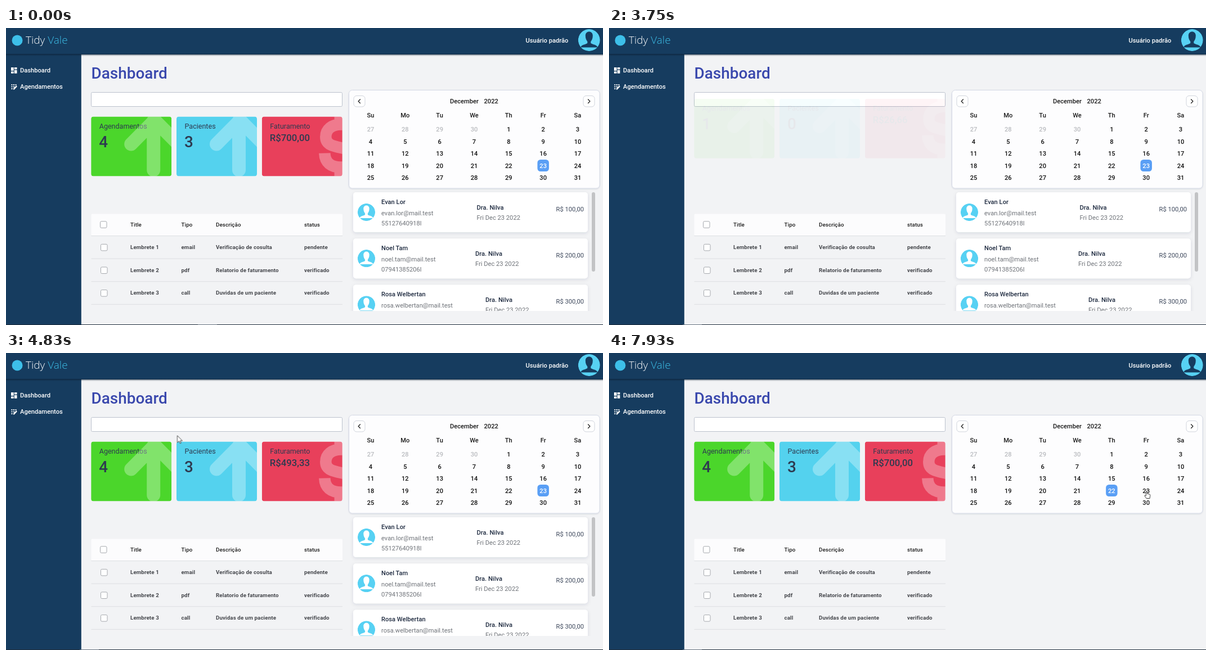
An HTML page that plays this animation: 1061 by 528 pixels, repeating every 8000 ms.

```html
<!DOCTYPE html>
<html lang="pt">
<head>
<meta charset="utf-8">
<title>Dashboard</title>
<style>
html, body { margin: 0; width: 100%; height: 100%; overflow: hidden; background: #f2f3f5; }
svg { display: block; width: 100%; height: 100%; }
text { font: 500 11.15px Roboto, sans-serif; fill: #1a1a1a; white-space: pre; }
.nav { fill: #fff; }
.brand { font: 300 19px "Open Sans", sans-serif; fill: #fff; }
.h1 { font-size: 27.9px; fill: #3a48ad; }
.label { font-size: 12.55px; font-weight: 400; fill: #2e3a50; }
.count { font-size: 27.9px; fill: #2e3a50; }
.money { font-size: 16.73px; fill: #2e3a50; }
.th, .td { font-size: 9.76px; letter-spacing: .0107em; }
.td { font-weight: 600; fill: #45474c; }
.day { fill: #111; text-anchor: middle; }
.out { fill: #b9bbbf; }
.on { fill: #fff; }
.mid { text-anchor: middle; }
.name { fill: #1f2b40; }
.soft { font-weight: 400; fill: #6e7278; }
.price { font-weight: 400; fill: #3b465a; text-anchor: end; }

#cards, #cursor, .before, .after, .arrow, .beam, .hand, .tab { animation: 8s linear infinite; }
#cards { animation-name: drop; }
#cursor { animation-name: travel; }
.before { animation-name: before; animation-timing-function: step-end; }
.after { animation-name: after; animation-timing-function: step-end; }
.arrow { animation-name: arrow; animation-timing-function: step-end; }
.beam { animation-name: beam; animation-timing-function: step-end; }
.hand { animation-name: hand; animation-timing-function: step-end; }
.tab { animation-name: tab; animation-timing-function: step-end; }

@keyframes drop {
  0%, 46.62% { transform: none; opacity: 1; }
  46.625% { transform: translateY(-34px); opacity: .035; }
  48.9% { transform: translateY(-15px); opacity: .23; }
  51% { transform: translateY(-4.2px); opacity: .5; }
  53.5% { transform: translateY(-.2px); opacity: .97; }
  54.4%, 100% { transform: none; opacity: 1; }
}
@keyframes travel {
  0%, 6.375% { transform: translate(842px, 497px); animation-timing-function: ease-in; }
  10.6% { transform: translate(387px, 241px); animation-timing-function: ease-out; }
  15.75% { transform: translate(41px, 17px); }
  17.5% { transform: translate(35px, 10px); }
  19.2%, 53.7% { transform: translate(33px, -20px); }
  53.71% { transform: translate(86px, -18px); }
  56.9% { transform: translate(165px, 98px); }
  57.75% { transform: translate(179px, 113px); animation-timing-function: ease-out; }
  67.75% { transform: translate(495px, 198px); }
  69.7% { transform: translate(503px, 201px); animation-timing-function: ease-in-out; }
  78.2% { transform: translate(794px, 223px); animation-timing-function: ease-out; }
  84% { transform: translate(893px, 244px); }
  89% { transform: translate(896px, 246px); animation-timing-function: ease-in-out; }
  92.2% { transform: translate(954px, 246px); }
  93.25%, 95.7% { transform: translate(948px, 245px); }
  99.1%, 100% { transform: translate(955.5px, 245px); }
}
@keyframes before { 0% { opacity: 1; } 85.5%, 100% { opacity: 0; } }
@keyframes after { 0% { opacity: 0; } 85.5%, 100% { opacity: 1; } }
@keyframes arrow { 0% { opacity: 0; } 6.375% { opacity: 1; } 19.1% { opacity: 0; } 53.7% { opacity: 1; } 68.6% { opacity: 0; } 71% { opacity: 1; } 82%, 100% { opacity: 0; } }
@keyframes beam { 0% { opacity: 0; } 68.6% { opacity: .6; } 71%, 100% { opacity: 0; } }
@keyframes hand { 0% { opacity: 0; } 82%, 100% { opacity: 1; } }
@keyframes tab { 0% { transform: none; } 28.25%, 100% { transform: translateX(-210px); } }
</style>
</head>
<body>
<svg viewBox="0 0 1061 528" preserveAspectRatio="none">
  <defs>
    <filter id="shadow" x="-10%" y="-20%" width="120%" height="150%">
      <feDropShadow dx="0" dy="2" stdDeviation="3" flood-color="#1c2c48" flood-opacity=".11"/>
    </filter>
    <filter id="lift" x="-5%" y="-5%" width="110%" height="115%">
      <feDropShadow dx="0" dy="1" stdDeviation=".8" flood-color="#1c2c48" flood-opacity=".12"/>
    </filter>
    <linearGradient id="edge" x2="0" y2="1">
      <stop stop-color="#0b2035" stop-opacity=".7"/><stop offset="1" stop-color="#0b2035" stop-opacity="0"/>
    </linearGradient>
    <clipPath id="round"><circle r="19.5"/></clipPath>
    <clipPath id="tile"><rect width="143" height="106" rx="4"/></clipPath>
    <clipPath id="panel"><rect x="605" y="286" width="456" height="217"/></clipPath>
    <g id="person" clip-path="url(#round)">
      <circle r="19.5" fill="#57d1f3"/>
      <path d="M-6.500-8C-6.500-17.500 6.500-17.500 6.500-8C6.500-3 5 0 3 2.500V5.500C6 8 14 8 15 13H-15C-14 8-6 8-3 5.500V2.500C-5 0-6.500-3-6.500-8Z"/>
    </g>
    <path id="up" d="M71 49L113 6.500L155 49M111 7V95" fill="none" stroke="#fff" stroke-opacity=".3" stroke-width="24" stroke-linecap="round"/>
  </defs>

  <rect width="1061" height="528" fill="#f2f3f5"/>
  <path d="M0 0H1061V47H133.800V528H0Z" fill="#163c5f"/>
  <rect y="46" width="1061" height="4" fill="url(#edge)"/>
  <circle cx="20" cy="22" r="9.500" fill="#3dbfe9"/>
  <text class="brand" x="35" y="28">Tidy <tspan fill="#3dbfe9">Vale</tspan></text>
  <text class="nav" x="923.500" y="26">Usuário padrão</text>
  <use href="#person" x="1036.300" y="21.600" fill="#163c5f"/>

  <g fill="#fff">
    <path d="M9 70h4.700v6H9zM14.800 70h4.700v3.500h-4.700zM9 77.200h4.700v3.500H9zM14.800 74.700h4.700v6h-4.700z"/>
    <path d="M9.500 100h2v2h-2zM13 100h2v2h-2zM16.500 100h2v2h-2zM9.500 103.500h2v2h-2zM13 103.500h2v2h-2zM9.500 107h2v2h-2zM13 109.500v-2l5.200-5.200 1.700 1.700-5.200 5.500z"/>
  </g>
  <text class="nav" x="25" y="79">Dashboard</text>
  <text class="nav" x="25" y="108">Agendamentos</text>

  <text class="h1" x="151.500" y="90">Dashboard</text>
  <rect x="151.500" y="114.500" width="446" height="25" rx="2" fill="#fff" stroke="#bcc2cd"/>

  <g id="cards"></g>
  <g id="table"></g>

  <rect x="609.500" y="110.500" width="445.500" height="174.500" rx="6" fill="#fdfdfe" stroke="#d5d9e6" filter="url(#lift)"/>
  <g id="calendar"></g>
  <g id="visits" class="before" clip-path="url(#panel)"></g>

  <rect y="527" width="1061" height="1" fill="#1d2b3a"/>
  <rect class="tab" x="341" y="527" width="34" height="1" fill="#66727f"/>

  <g id="cursor">
    <path class="arrow" d="M0 0V12.500L3 9.800L5 14L6.800 13.200L5 9.200H9Z" fill="#fff" stroke="#222" stroke-width=".8"/>
    <path class="beam" d="M-2 0H2M0 0V12M-2 12H2" fill="none" stroke="#333" stroke-width=".8"/>
    <path class="hand" d="M-1 1Q0-.5 1 1V5L5 6Q6.500 6.500 6.300 8.500L5.500 13.500H-.5L-3.500 9Q-3.500 7-1 8.500Z" fill="#fff" stroke="#222" stroke-width=".9"/>
  </g>
</svg>
<script>
const byId = id => document.getElementById(id);
const text = (x, y, str, cls = '', extra = '') => `<text x="${x}" y="${y}" class="${cls}" ${extra}>${str}</text>`;
const rect = (x, y, w, h, rx, attrs) => `<rect x="${x}" y="${y}" width="${w}" height="${h}" rx="${rx}" ${attrs}/>`;

const dollar = `<path d="M168 36C166 18 155 14 140 14C125 14 113.500 22 113.500 36C113.500 64 167 47 167 74C167 86 155 90 140 90C123 90 112 82 111.500 65M139 14V-6M139 90V112"
  fill="none" stroke="#fff" stroke-opacity=".3" stroke-width="20.500"/>`;
const arrowUp = '<use href="#up"/>';
const tile = (x, color, label, art, cls, id, y) => `<g transform="translate(${x} 157.500)">
  <g clip-path="url(#tile)">${rect(0, 0, 143, 106, 4, `fill="${color}"`)}${text(14.5, 21.5, label, 'label')}${art}</g>
  ${text(14, y, '', cls, `id="${id}"`)}</g>`;
byId('cards').innerHTML =
  tile(151.2, '#4bd62b', 'Agendamentos', arrowUp, 'count', 'bookings', 54) +
  tile(303, '#54d2ee', 'Pacientes', arrowUp, 'count', 'patients', 54) +
  tile(454.8, '#e8405b', 'Faturamento', dollar, 'money', 'revenue', 43.5);

const columns = [221, 311.5, 373, 530];
const rows = [
  ['Title', 'Tipo', 'Descrição', 'status'],
  ['Lembrete 1', 'email', 'Verificação de cosulta', 'pendente'],
  ['Lembrete 2', 'pdf', 'Relatorio de faturamento', 'verificado'],
  ['Lembrete 3', 'call', 'Duvidas de um paciente', 'verificado']
];
byId('table').innerHTML = rect(151.5, 330.5, 446.5, 39, 2, 'fill="#fcfcfd"') + rows.map((cells, i) => {
  const mid = 349.5 + i * 40.6;
  return rect(i ? 168.5 : 167.5, mid - 5.7, 11.5, 11.5, 2, 'fill="#fff" stroke="#a5a8ad"') +
    rect(151.5, 369 + i * 40.6, 446.5, 1, 0, 'fill="#dcdee1"') +
    cells.map((cell, c) => text(columns[c], Math.floor(mid + 3.5), cell, i ? 'td' : 'th')).join('');
}).join('');

const colX = c => 648 + c * 61.33;
const rowY = r => 184 + r * 21.6;
const arrowButton = (x, d) => rect(x, 120.5, 20, 19.5, 5, 'fill="#fff" stroke="#d0d4dc"') +
  `<path d="M${x + 10 + d} 126.500L${x + 10 - d} 130.200L${x + 10 + d} 134" fill="none" stroke="#222" stroke-width="1.300"/>`;
const selected = (col, day, cls) => `<g class="${cls}">${rect(colX(col) - 10.2, 234, 20.5, 21, 5.5, 'fill="#5a9ff5"')}
  ${text(colX(col), rowY(3), day, 'day on')}</g>`;
let calendar = arrowButton(618, 1.8) + arrowButton(1026, -1.8) +
  text(789, 134, 'December') + text(849.5, 134, '2022') +
  ['Su', 'Mo', 'Tu', 'We', 'Th', 'Fr', 'Sa'].map((d, i) => text(colX(i), 159, d, 'mid')).join('');
for (let i = 0; i < 35; i++) {
  const day = i < 4 ? 27 + i : i - 3;
  calendar += text(colX(i % 7), rowY(Math.floor(i / 7)), day, i < 4 ? 'day out' : 'day');
}
byId('calendar').innerHTML = calendar + selected(5, 23, 'before') + selected(4, 22, 'after');

const visits = [
  ['Evan Lor', '55127640918l', 836.5, 'R$ 100,00'],
  ['Noel Tam', '07941385206l', 834, 'R$ 200,00'],
  ['Rosa Welbertan', '21873096544l', 852, 'R$ 300,00']
];
byId('visits').innerHTML = visits.map(([name, phone, x, price], i) => `<g transform="translate(0 ${292 + i * 82.2})">
  ${rect(617, 0, 417, 71, 5, 'fill="#fff" filter="url(#shadow)"')}
  <use href="#person" transform="translate(640.500 35.500) scale(.8)" fill="#fff"/>
  ${text(667, 20.5, name, 'name')}
  ${text(667, 41, name.toLowerCase().replace(' ', '.') + '@mail.test', 'soft')}
  ${text(667, 59, phone, 'soft')}
  ${text(x, 30.5, 'Dra. Nilva', 'name')}
  ${text(x, 48.5, 'Fri Dec 23 2022', 'soft')}
  ${text(1027, 34, price, 'price')}</g>`).join('') + rect(1041, 292, 6, 141, 3, 'fill="#c2c3c5"');

const clock = byId('cards').getAnimations()[0];
const [bookings, patients, revenue] = ['bookings', 'patients', 'revenue'].map(byId);
const show = (el, value) => { if (el.textContent !== value) el.textContent = value; };

function tick() {
  const t = (clock.currentTime || 0) % 8000;
  const since = t < 3730 ? Infinity : t - 3730;
  show(bookings, String(Math.min(4, 1 + Math.floor(since / 150))));
  show(patients, String(Math.min(3, Math.floor(since / 105))));
  const ticks = 2 + Math.floor((since + 8) / 31);
  const sum = Math.floor(Math.min(700, ticks * 40 / 3) * 100) / 100;
  show(revenue, 'R$' + sum.toFixed(2).replace('.', ','));
  requestAnimationFrame(tick);
}
tick();
</script>
</body>
</html>
```
